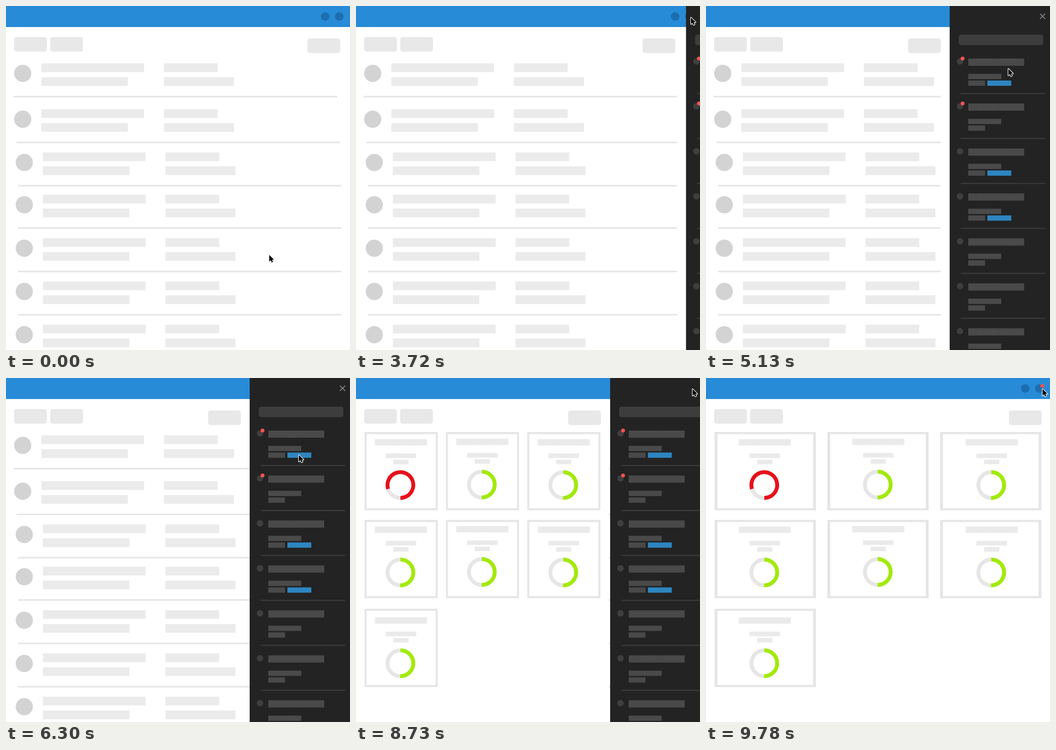
These frames come from a looping animation (720x720 px, 9810 ms). An HTML page with a canvas:

```html
<!DOCTYPE html>
<html lang="en">
<head>
<meta charset="utf-8">
<title>Side panel</title>
<style>
html, body { margin: 0; width: 100%; height: 100%; overflow: hidden; background: #fff; }
canvas { display: block; }
</style>
</head>
<body>
<canvas id="stage" width="720" height="720"></canvas>
<script>
const c = document.getElementById('stage').getContext('2d');
const LOOP = 9810;
const ROWS = [120, 216, 306.5, 395, 486, 576.5, 667];
const CURSOR_START = [551, 521];
// start, end, x, y
const MOVES = [
  [2040, 2900, 701, 24],
  [3720, 4020, 705, 23],
  [4500, 5400, 613, 161],
  [7120, 7870, 704.5, 23]
];

const mix = (a, b, p) => a + (b - a) * p;
function ease(t, from, to) {
  const s = Math.min(1, Math.max(0, (t - from) / (to - from)));
  return s * s * (3 - 2 * s);
}

function rect(x, y, w, h, color) {
  c.fillStyle = color;
  c.fillRect(x, y, w, h);
}
function round(x, y, w, h, r, color) {
  c.fillStyle = color;
  c.beginPath();
  c.roundRect(x, y, w, h, r);
  c.fill();
}
function dot(x, y, r, color) {
  c.fillStyle = color;
  c.beginPath();
  c.arc(x, y, r, 0, 7);
  c.fill();
}
function arc(x, y, from, to, color) {
  c.strokeStyle = color;
  c.lineWidth = 8;
  c.beginPath();
  c.arc(x, y, 27, from * Math.PI / 180, to * Math.PI / 180);
  c.stroke();
}
function striped(x, y, w, h, color, seam) {
  rect(x, y, w, h, color);
  for (let i = 4; i < w; i += 4) rect(x + i, y, 0.6, h, seam);
}

function list() {
  ROWS.forEach((y, i) => {
    const dx = i < 2 ? 0 : 3.3;
    dot(35 + dx, y + 21, 18, '#d3d3d3');
    for (const [x, dy, w] of [[74, 0, 215], [74, 29, 181], [330.5, 0, 112.5], [330.5, 29, 146.5]])
      rect(x + dx, y + dy, w, 18.3, '#ebebeb');
    if (i < 6) rect([16, 22][i] || 25, y + 68, 677, 3.3, '#e6e6e6');
  });
}

function cards(q) {
  rect(0, 104, mix(510, 705, q), 616, '#fff');
  const w = mix(146.5, 212, q), side = mix(4, 6, q);
  for (let i = 0; i < 7; i++) {
    const col = i % 3, row = Math.floor(i / 3);
    const x = 18 + col * mix(163, 236, q), y = [113, 297, 483][row];
    rect(x, y, w, 164, '#e6e6e6');
    rect(x + side, y + 4.5, w - 2 * side, 155, '#fff');

    const mid = x + w / 2 - 0.5 + q * (col * 1.5 - 0.5);
    const dy = [0, 183, 373][row] - (col === 1 ? 1 : 0);
    const bar = (by, bw, bh) => striped(mid - bw / 2, by + dy, bw, bh, '#ebebeb', '#e6e6e6');
    bar(128, 109, 13.3);
    bar(158, 64, 9.5);
    bar(171, 32, 9.5);

    const ringX = mid - 1, ringY = 224 + dy;
    arc(ringX, ringY, 0, 360, '#e6e6e6');
    if (i) arc(ringX, ringY, -90, 91, '#a2ea06');
    else arc(ringX, ringY, 162, 450, '#e7101a');
  }
}

function panel(x) {
  rect(x, 0, 720, 720, '#232323');
  c.strokeStyle = '#9a9a9a';
  c.lineWidth = 1.5;
  c.beginPath();
  c.moveTo(x + 189, 16); c.lineTo(x + 200, 27);
  c.moveTo(x + 200, 16); c.lineTo(x + 189, 27);
  c.stroke();
  round(x + 19, 60, 177, 22, 5, '#3d3d3d');
  for (let i = 0; i < 7; i++) {
    const y = i * 94.1;
    const bar = (bx, by, w, h) => striped(x + bx, y + by, w, h, '#4b4b4b', '#434343');
    dot(x + 21.7, y + 116, 6.7, '#3f3f3f');
    if (i < 2) dot(x + 27, y + 110, 4, '#ff5252');
    bar(39, 110, 117, 15);
    bar(39, 142, 69, 11);
    bar(39, 156, 35, 11);
    if (i === 0 || i === 2 || i === 3) striped(x + 79, y + 156, 50, 11, '#2e87c3', '#2a7ab0');
    rect(x + 23, y + 182, 177, 2.3, '#3c3c3c');
  }
}

function cursor(t) {
  let [x, y] = CURSOR_START;
  for (const [from, to, nx, ny] of MOVES) {
    const p = ease(t, from, to);
    x = mix(x, nx, p);
    y = mix(y, ny, p);
  }
  c.save();
  c.translate(x, y);
  c.beginPath();
  c.moveTo(0, 0);
  for (const [px, py] of [[0, 14], [3.2, 11], [5.3, 15.7], [7.8, 14.6], [5.8, 10], [10, 10]])
    c.lineTo(px, py);
  c.closePath();
  c.strokeStyle = '#fff';
  c.lineWidth = 2.4;
  c.lineJoin = 'round';
  c.stroke();
  c.fillStyle = '#000';
  c.fill();
  c.restore();
}

function draw(t) {
  const opened = ease(t, 3616, 4045), closed = ease(t, 8647, 9077);
  const panelX = mix(mix(722.7, 510, opened), 730, closed);
  const buttonX = mix(mix(631, 423, opened), 634, closed);

  rect(0, 0, 720, 720, '#fff');
  list();
  // margin strip that travels with the panel
  if (t > 3616 && t < 5460) rect(panelX - 18.5, 104, 40, 616, '#fff');

  c.globalAlpha = ease(t, 6300, 6700);
  if (c.globalAlpha) cards(closed);
  c.globalAlpha = 1;

  for (const [x, y] of [[17, 65], [92.5, 65], [buttonX, 68]])
    round(x, y, 68.5, 30.5, 5, '#e9e8e8');

  rect(0, 0, 720, 44, '#278bd8');
  dot(668, 22, 9, '#1c6eb0');
  dot(697.5, 22, 9, '#1c6eb0');
  dot(704, 16.5, 4 * ease(t, 1050, 1450), '#f0544f');

  if (panelX < 720) panel(panelX);
  cursor(t);
}

function frame() {
  draw(performance.now() % LOOP);
  requestAnimationFrame(frame);
}
frame();
</script>
</body>
</html>
```
